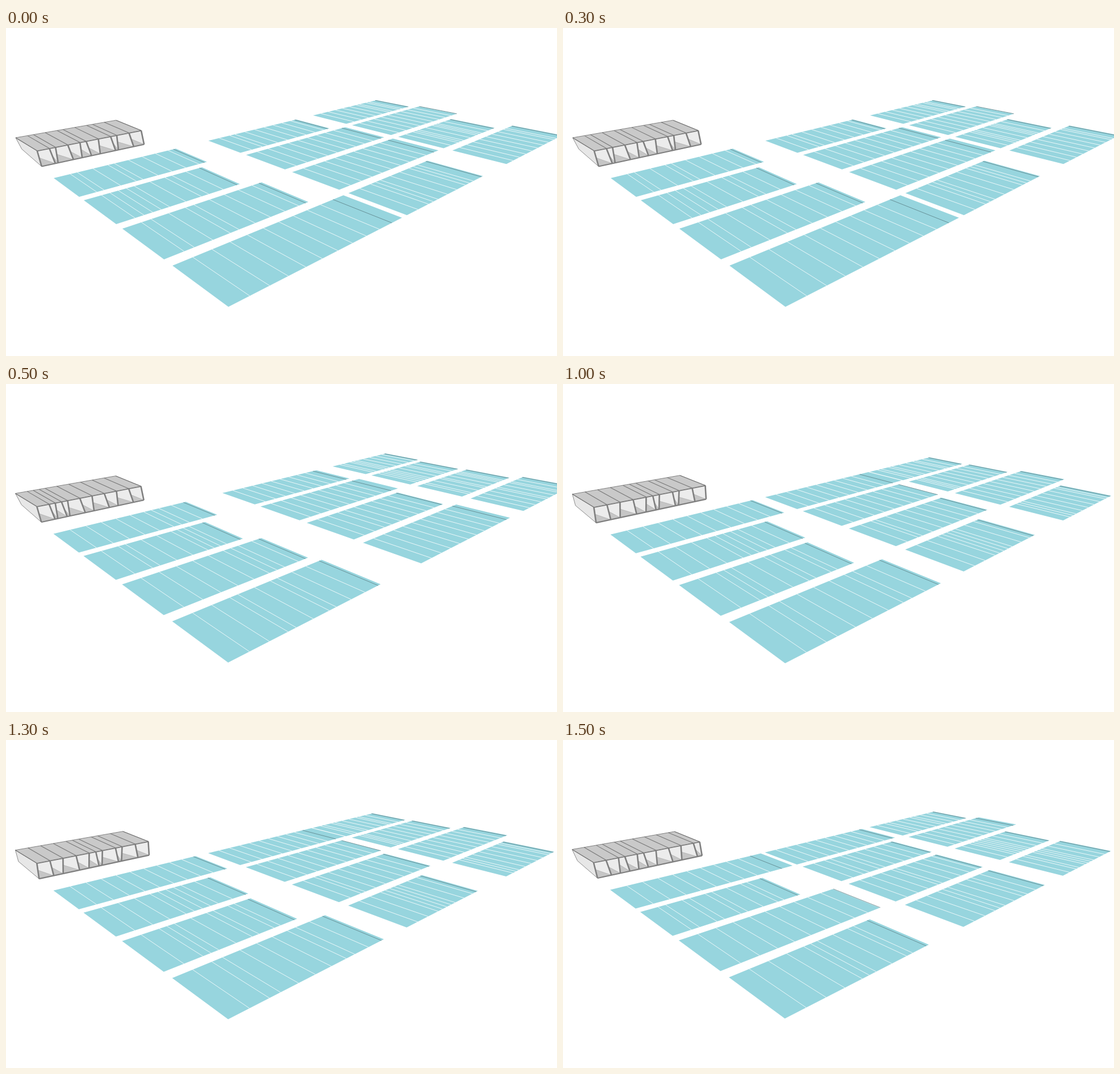
These frames come from a looping animation (970x577 px, 2 s). An HTML page with a canvas:

```html
<!DOCTYPE html>
<html lang="en">
<head>
<meta charset="utf-8">
<title>Roof layouts</title>
<style>
html, body { margin: 0; width: 100%; height: 100%; overflow: hidden; background: #fff; }
canvas { display: block; }
</style>
</head>
<body>
<canvas id="stage" width="970" height="577"></canvas>
<script>
const ctx = document.getElementById('stage').getContext('2d');
const HORIZON = -77, VANISH_LEFT = -379, VANISH_RIGHT = 1497;
const ROWS = [[264, 297], [303, 345], [353, 407], [418, 490.5]];
const MODULES = 10, WIDE = 0.062, NARROW = 0.03;

// Panel lengths in ground units, one list per column from back to front.
const layouts = [
  {
    shift: [0, 0], pitch: 0.7, reach: 0.127, lean: 8,
    lengths: [[0.526, 0.475, 0.544, 0.673], [0.57, 0.645, 0.657, 0.501], [0.572, 0.617, 0.489, 0.6]]
  },
  {
    shift: [-0.5, -0.5], pitch: 0.782, reach: 0.127, lean: 8,
    lengths: [[0.579, 0.491, 0.544, 0.565], [0.647, 0.677, 0.616, 0.653], [0.508, 0.477, 0.497, 0.566]]
  },
  {
    shift: [-0.5, 0.7], pitch: 0.7, reach: 0.136, lean: 4,
    lengths: [[0.631, 0.516, 0.493, 0.581], [0.689, 0.619, 0.595, 0.463], [0.537, 0.557, 0.636, 0.503]]
  },
  {
    shift: [-1, -0.5], pitch: 0.7, reach: 0.1295, lean: 7,
    lengths: [[0.677, 0.494, 0.617, 0.524], [0.64, 0.576, 0.56, 0.545], [0.583, 0.653, 0.471, 0.503]]
  }
];

const mix = (a, b, t) => [a[0] + (b[0] - a[0]) * t, a[1] + (b[1] - a[1]) * t];

// Ground point at distance u along the row line that starts at height y.
function ground(u, y) {
  const depth = y - HORIZON, w = 1000 / depth;
  const x = VANISH_LEFT + 463 * depth / 341;
  return mix([x, y], [VANISH_RIGHT, HORIZON], u / (w + u));
}

function trace(points) {
  ctx.beginPath();
  points.forEach(p => ctx.lineTo(p[0], p[1]));
}

function shape(points, fill, stroke, width = 1) {
  trace(points);
  ctx.closePath();
  ctx.fillStyle = fill;
  ctx.fill();
  if (!stroke) return;
  ctx.strokeStyle = stroke;
  ctx.lineWidth = width;
  ctx.stroke();
}

function line(a, b, color, width) {
  trace([a, b]);
  ctx.strokeStyle = color;
  ctx.lineWidth = width;
  ctx.stroke();
}

function random(seed) {
  seed = seed * 7919 % 2147483647;
  return () => (seed = (seed * 16807) % 2147483647) / 2147483647;
}

// Ends of ten modules: the first is wide, narrow ones are shuffled in to fit the length.
function moduleEnds(length, seed) {
  const next = random(seed);
  const used = Math.min(length - 0.012, MODULES * WIDE);
  let narrow = Math.round((MODULES * WIDE - used) / (WIDE - NARROW));
  const narrowWidth = narrow && (used - (MODULES - narrow) * WIDE) / narrow;
  let end = 0;
  return Array.from({ length: MODULES }, (_, i) => {
    const isNarrow = i > 0 && next() < narrow / (MODULES - i);
    if (isNarrow) narrow--;
    return end += isNarrow ? narrowWidth : WIDE;
  });
}

function drawPanel([back, front], start, length, seed) {
  const end = start + length;
  shape([ground(start, back), ground(start, front), ground(end, front), ground(end, back)], '#97d5de');
  moduleEnds(length, seed).forEach((u, i) => {
    const last = i === MODULES - 1;
    line(ground(start + u, back), ground(start + u, front), last ? '#5b7f86' : '#fff', 0.8);
  });
}

function drawHall({ reach, lean }, seed) {
  const toward = (p, t) => mix(p, [VANISH_RIGHT, -65], t);
  const backLeft = [17, 193], left = [54.8, 216];
  const lowLeft = [left[0] + lean, left[1] + 27.5];
  const foot = [backLeft[0] + lean * 1.35, backLeft[1] + 20];
  const backRight = toward(backLeft, reach * 0.94);
  const right = toward(left, reach), lowRight = toward(lowLeft, reach * 0.99);
  const edge = '#7f7f7f';

  shape([backLeft, left, lowLeft, foot], '#e7e7e7', edge, 0.9);
  shape([left, right, lowRight, lowLeft], '#ececec');

  const ends = moduleEnds(0.54, seed);
  const fractions = [0, ...ends.map(u => u / ends[MODULES - 1])];
  const posts = fractions.map((t, i) => {
    const slant = i % MODULES ? (i % 2 ? 0.016 : -0.016) : 0;
    return [mix(left, right, t), mix(lowLeft, lowRight, t + slant)];
  });
  posts.slice(1).forEach((post, i) => {
    const [top, bottom] = posts[i];
    shape([bottom, mix(bottom, top, 0.55), post[1]], '#c6c6c6', '#999', 0.5);
  });
  posts.forEach(([top, bottom]) => line(top, bottom, edge, 2.6));
  line(left, right, edge, 2.4);
  line(lowLeft, lowRight, edge, 2.2);

  shape([backLeft, backRight, right, left], '#c9c9c9', '#777', 0.9);
  fractions.forEach(t => line(mix(backLeft, backRight, t), mix(left, right, t), '#777', 1.1));
}

function draw(index) {
  const layout = layouts[index];
  ctx.fillStyle = '#fff';
  ctx.fillRect(0, 0, 970, 577);
  ctx.save();
  ctx.translate(...layout.shift);
  layout.lengths.forEach((column, col) => column.forEach((length, row) =>
    drawPanel(ROWS[row], col * layout.pitch, length, 1 + index * 12 + col * 4 + row)));
  drawHall(layout, 101 + index);
  ctx.restore();
}

function tick(now) {
  draw(Math.floor(now / 500) % layouts.length);
  requestAnimationFrame(tick);
}
draw(0);
requestAnimationFrame(tick);
</script>
</body>
</html>
```
